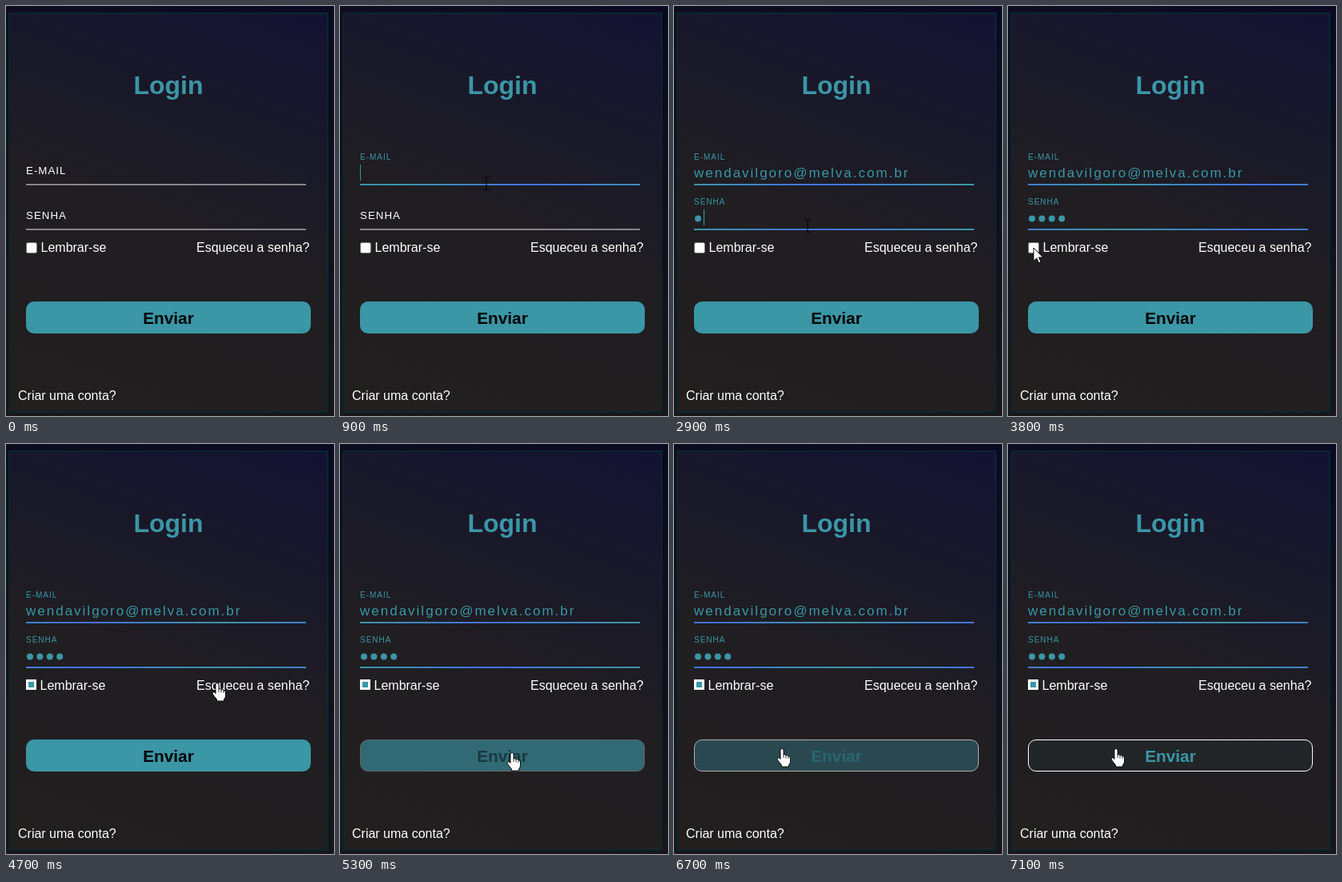
An HTML page for the animation above (7200 ms loop, 410 by 512 pixels).

```html
<!DOCTYPE html>
<html lang="pt-BR">
<head>
<meta charset="utf-8">
<title>Login</title>
<style>
:root { --teal: #3b96a5; --blue: #4470e4; --loop: 7.2s; }
html, body { margin: 0; width: 100%; height: 100%; overflow: hidden; }
body {
  position: relative;
  background: linear-gradient(197deg, #0b0922, #11101c 45%, #191717 85%);
  font: 16px/20px "Liberation Sans", Arial, sans-serif;
  color: #fff;
}
body * { box-sizing: border-box; }
.card {
  position: absolute; left: 3px; top: 8px; width: 400px; height: 500px;
  border: 2px solid #07272f;
  background: linear-gradient(200deg, #141233 0%, #191829 27%, #201e21 55%, #221f1f 100%);
}
svg { position: absolute; left: 0; top: 0; overflow: visible; }
.scene { width: 410px; height: 512px; }
text { fill: #fff; }
.title { font-size: 32px; font-weight: bold; fill: var(--teal); text-anchor: middle; }
.value { font-size: 17px; letter-spacing: 2px; fill: var(--teal); }
.label { font-size: 13.33px; letter-spacing: 1px; }
.caret, .dots, .tick { fill: var(--teal); }

.line { position: absolute; left: 25px; width: 350px; height: 2px; background: #85848a; }
.line i {
  display: block; height: 2px;
  background: linear-gradient(90deg, var(--blue), var(--teal), var(--blue)) 0 0 / 350px 2px;
}
.send {
  position: absolute; left: 25px; top: 369px; width: 356px; height: 40px;
  border: 1px solid transparent; border-radius: 10px;
  background: var(--teal) border-box; color: #000;
  font-size: 20.8px; font-weight: bold; line-height: 39px; text-align: center;
  animation: send var(--loop) infinite;
}
.mouse { position: absolute; left: 0; top: 0; animation: move var(--loop) ease-in-out infinite; }

/* 1% = 72 ms */
.email { animation: float var(--loop) infinite; }
.pass { animation: float2 var(--loop) infinite; }
.line.a i { animation: flow 2.4s linear infinite, on-a var(--loop) step-end infinite; }
.line.b i { animation: flow 2.4s linear infinite, on-b var(--loop) step-end infinite; }
.value { animation: fill var(--loop) step-end infinite; }
.caret.a { animation: caret-a var(--loop) step-end infinite; }
.caret.b { animation: caret-b var(--loop) step-end infinite; }
.dots { animation: dots var(--loop) step-end infinite; }
.box { animation: off var(--loop) step-end infinite; }
.checked { animation: on var(--loop) step-end infinite; }
.beam { animation: beam var(--loop) step-end infinite; }
.arrow { animation: arrow var(--loop) step-end infinite; }
.hand { animation: hand var(--loop) step-end infinite; }

@keyframes float {
  0%, 9.72% { font-size: 13.33px; transform: none; fill: #fff; }
  12.5%, 100% { font-size: 10px; transform: translateY(-18px); fill: #3b96a5; }
}
@keyframes float2 {
  0%, 34.72% { font-size: 13.33px; transform: none; fill: #fff; }
  37.5%, 100% { font-size: 10px; transform: translateY(-18px); fill: #3b96a5; }
}
@keyframes flow { from { background-position: -262.5px 0; } to { background-position: 87.5px 0; } }
@keyframes on-a { 0% { opacity: 0; } 9.72%, 100% { opacity: 1; } }
@keyframes on-b { 0% { opacity: 0; } 34.72%, 100% { opacity: 1; } }
@keyframes fill { 0% { opacity: 0; } 30.5%, 100% { opacity: 1; } }
@keyframes caret-a {
  0% { opacity: 0; transform: none; }
  9.72% { opacity: 1; }
  16.67% { opacity: 0; }
  23.6% { opacity: 1; transform: none; }
  30.5% { opacity: 1; transform: translateX(270px); }
  34.72%, 100% { opacity: 0; transform: translateX(270px); }
}
@keyframes caret-b {
  0% { opacity: 0; transform: none; }
  34.72% { opacity: 1; transform: none; }
  38.8% { opacity: 1; transform: translateX(12px); }
  40.9% { opacity: 1; transform: translateX(24.5px); }
  43% { opacity: 1; transform: translateX(37px); }
  45.1% { opacity: 1; transform: translateX(49.5px); }
  52%, 100% { opacity: 0; transform: translateX(49.5px); }
}
@keyframes dots {
  0% { clip-path: inset(0 100% 0 0); }
  38.8% { clip-path: inset(0 75% 0 0); }
  40.9% { clip-path: inset(0 50% 0 0); }
  43% { clip-path: inset(0 25% 0 0); }
  45.1%, 100% { clip-path: inset(0); }
}
@keyframes off { 0% { opacity: 1; } 54.1%, 100% { opacity: 0; } }
@keyframes on { 0% { opacity: 0; } 54.1%, 100% { opacity: 1; } }
@keyframes send {
  0%, 71.94% { background-color: #3b96a5; color: #000; border-color: transparent; }
  71.95% { background-color: #3b96a5; color: #000; border-color: #000; }
  78.89%, 79.9% { background-color: #3b96a50f; color: #3b96a5; border-color: #fff; }
  79.91% { background-color: #3b96a50f; color: #3b96a5; border-color: transparent; }
  86.85%, 90.27% { background-color: #3b96a5; color: #000; border-color: transparent; }
  90.28% { background-color: #3b96a5; color: #000; border-color: #000; }
  97.22%, 100% { background-color: #3b96a50f; color: #3b96a5; border-color: #fff; }
}
@keyframes move {
  0%, 30.5% { transform: translate(183px, 221px); }
  34%, 45.8% { transform: translate(167px, 274px); }
  52.7%, 56.2% { transform: translate(32px, 302px); }
  63.9%, 68% { transform: translate(264px, 299px); }
  72.9%, 77.8% { transform: translate(215px, 386px); }
  80.5%, 81.2% { transform: translate(195px, 424px); }
  86.1%, 88.9% { transform: translate(80px, 484px); }
  91.1%, 100% { transform: translate(135px, 381px); }
}
@keyframes beam { 0% { opacity: 0; } 5.5% { opacity: 1; } 47.2%, 100% { opacity: 0; } }
@keyframes arrow {
  0% { opacity: 0; }
  47.2% { opacity: 1; }
  62.5% { opacity: 0; }
  69% { opacity: 1; }
  71.9% { opacity: 0; }
  79.4% { opacity: 1; }
  85% { opacity: 0; }
  89.4% { opacity: 1; }
  90.3%, 100% { opacity: 0; }
}
@keyframes hand {
  0% { opacity: 0; }
  62.5% { opacity: 1; }
  69% { opacity: 0; }
  71.9% { opacity: 1; }
  79.4% { opacity: 0; }
  85% { opacity: 1; }
  89.4% { opacity: 0; }
  90.3%, 100% { opacity: 1; }
}
</style>
</head>
<body>
<div class="card"></div>
<div class="line a" style="top:222px"><i></i></div>
<div class="line b" style="top:278px"><i></i></div>
<div class="send">Enviar</div>

<svg class="scene" viewBox="0 0 410 512">
  <text class="title" x="203" y="110">Login</text>
  <text class="label email" x="25" y="210">E-MAIL</text>
  <text class="label pass" x="25" y="266">SENHA</text>
  <text class="value" x="25" y="214">wendavilgoro@melva.com.br</text>
  <rect class="caret a" x="25" y="198" width="1" height="20"/>
  <rect class="caret b" x="25" y="254" width="1" height="20"/>
  <g class="dots">
    <circle cx="30" cy="265.5" r="4"/>
    <circle cx="42.4" cy="265.5" r="4"/>
    <circle cx="54.8" cy="265.5" r="4"/>
    <circle cx="67.2" cy="265.5" r="4"/>
  </g>
  <g class="box">
    <rect x="25.5" y="295.5" width="13" height="13" rx="2" fill="#fff" stroke="#767676"/>
    <text x="43.5" y="307">Lembrar-se</text>
  </g>
  <g class="checked">
    <rect x="25" y="294" width="13" height="13" fill="#fff"/>
    <rect class="tick" x="28" y="297" width="7" height="7"/>
    <text x="42.5" y="307">Lembrar-se</text>
  </g>
  <text x="238" y="307">Esqueceu a senha?</text>
  <text x="15" y="492">Criar uma conta?</text>
</svg>

<div class="mouse">
  <svg width="1" height="1">
    <path class="beam" d="M-3.5-7.5h2.5l1 1 1-1h2.5M0-6.5v14M-3.5 8.5h2.5l1-1 1 1h2.5" fill="none" stroke="#000"/>
    <path class="arrow" d="M0 0V16.5l3.8-3.6 2.6 5.8 2.6-1.1-2.5-5.7h5.2z" fill="#fff" stroke="#000" stroke-width=".9"/>
    <path class="hand" d="M-2 1.5a2 2 0 0 1 4 0V7q2-1 3 .8 2-.8 3 .9 2.500-.3 2.500 2.300v4q0 3-2 5v2H-.5v-2Q-3 17-5.500 13.500q-1-2 .5-2.800 1.500-.4 3 1.800z" fill="#fff" stroke="#000" stroke-width=".9"/>
    <path class="hand" d="M2 7v4M5 8v3.500M8 9v3" fill="none" stroke="#000" stroke-width=".8"/>
  </svg>
</div>
</body>
</html>
```
